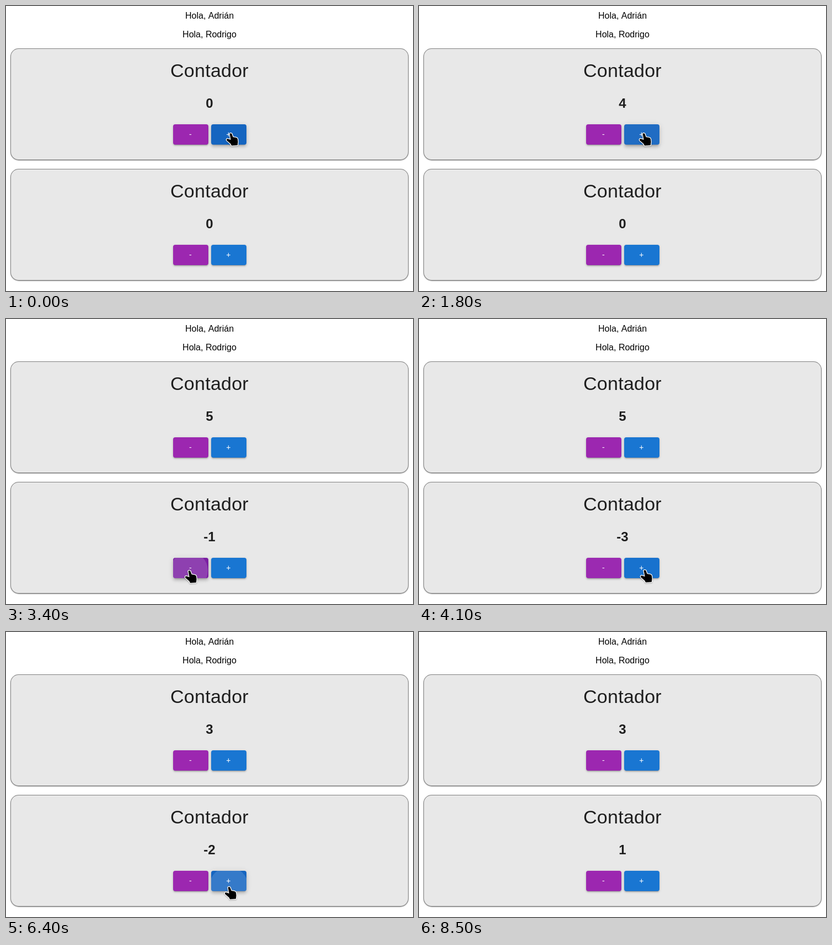
These frames come from a looping animation (738 by 518 pixels, 8.9 s). An HTML page with a canvas:

```html
<!DOCTYPE html>
<html lang="es">
<head>
<meta charset="utf-8">
<title>Contador</title>
<style>
  html, body { margin: 0; width: 100%; height: 100%; overflow: hidden; background: #fff; }
  canvas { display: block; }
</style>
</head>
<body>
<canvas id="stage" width="738" height="518"></canvas>
<script>
const ctx = document.getElementById('stage').getContext('2d');
const LOOP = 8900, STEP = 100, HOLD = 100, RIPPLE = 550, FADE = 250, EXIT = 8400;
const FONT = '"Liberation Sans", Arial, sans-serif';
const INK = 'rgba(0,0,0,0.87)';
const BUTTON = { w: 64, h: 37, r: 4 };
const STYLE = {
  [-1]: { label: '-', x: 303, idle: [156, 39, 176], hover: [123, 31, 162] },
  [1]: { label: '+', x: 372, idle: [25, 118, 210], hover: [21, 101, 192] }
};
const cardTop = counter => 77 + 219 * counter;
const buttonTop = counter => cardTop(counter) + 138;

// Where the pointer rests, and the evenly spaced clicks it makes there
const stops = [
  { x: 407, y: 231, arrive: -1000, leave: 2300, counter: 0, sign: 1, first: 340, gap: 350, clicks: 5 },
  { x: 305, y: 489, arrive: 2765, leave: 2765 },
  { x: 332, y: 457, arrive: 3080, leave: 3850, counter: 1, sign: -1, first: 3120, gap: 250, clicks: 3 },
  { x: 409, y: 456, arrive: 4100, leave: 4200, counter: 1, sign: 1, clicks: 0 },
  { x: 335, y: 243, arrive: 4700, leave: 5550, counter: 0, sign: -1, first: 4880, gap: 320, clicks: 2 },
  { x: 404, y: 463, arrive: 5970, leave: 7700, counter: 1, sign: 1, first: 6115, gap: 395, clicks: 4 },
  { x: 118, y: 1, arrive: 8100, leave: 8200 },
  { x: 64, y: -8, arrive: EXIT, leave: EXIT }
];
for (const s of stops) {
  s.presses = Array.from({ length: s.clicks || 0 }, (_, i) => s.first + i * s.gap);
}
const stopsOn = (counter, sign) => stops.filter(s => s.counter === counter && s.sign === sign);

const clamp = v => Math.max(0, Math.min(1, v));
const lerp = (a, b, k) => a + (b - a) * k;
const smooth = k => k * k * (3 - 2 * k);

// cubic-bezier(0.4, 0, 0.2, 1), solved by bisection
function ease(x) {
  x = clamp(x);
  let lo = 0, hi = 1;
  for (let i = 0; i < 18; i++) {
    const s = (lo + hi) / 2;
    const bx = 1.2 * s * (1 - s) ** 2 + 0.6 * s * s * (1 - s) + s ** 3;
    if (bx < x) lo = s; else hi = s;
  }
  return smooth(lo);
}

function pointerAt(t) {
  if (t > EXIT) return null;
  const i = stops.findIndex(s => t <= s.leave);
  const to = stops[i], from = stops[i - 1];
  if (t >= to.arrive) return to;
  const k = smooth((t - from.leave) / (to.arrive - from.leave));
  return { x: lerp(from.x, to.x, k), y: lerp(from.y, to.y, k) };
}

// 0 = idle, 1 = hovered, 2 = pressed, smoothed after every change
function buttonLevel(visits, t) {
  const events = visits.flatMap(s => [
    [s.arrive - 60, 1],
    ...s.presses.flatMap(p => [[p, 2], [p + HOLD, 1]]),
    [s.leave + 90, 0]
  ]);
  let from = 0, to = 0, since = 0;
  const at = time => lerp(from, to, ease((time - since) / FADE));
  for (const [time, target] of events) {
    if (time > t) break;
    [from, to, since] = [at(time), target, time];
  }
  return at(t);
}

const countAt = (counter, t) => stops
  .filter(s => s.counter === counter)
  .reduce((sum, s) => sum + s.sign * s.presses.filter(p => p + HOLD <= t).length, 0);

function roundRect(x, y, w, h, r) {
  ctx.beginPath();
  ctx.roundRect(x, y, w, h, r);
}

function shadowLayer(box, alpha, dy, blur, spread) {
  const away = 2000;
  ctx.save();
  ctx.shadowColor = `rgba(0,0,0,${alpha})`;
  ctx.shadowBlur = blur;
  ctx.shadowOffsetX = away;
  ctx.shadowOffsetY = dy;
  ctx.fillStyle = '#000';
  roundRect(box.x - spread - away, box.y - spread,
    box.w + 2 * spread, box.h + 2 * spread, box.r + spread);
  ctx.fill();
  ctx.restore();
}

// Umbra, penumbra and ambient shadow of a raised surface
function elevate(box, e) {
  shadowLayer(box, 0.2, 1.5 + 0.4 * e, 0.6 * e, -1 - e / 4);
  shadowLayer(box, 0.14, e, 1.25 * e, 0);
  shadowLayer(box, 0.12, Math.max(1, e / 3), Math.min(14, 2.5 * e), 0);
}

function text(str, x, y, font, color, spacing = 0) {
  ctx.font = `${font} ${FONT}`;
  ctx.letterSpacing = `${spacing}px`;
  ctx.textAlign = 'center';
  ctx.fillStyle = color;
  ctx.fillText(str, x, y);
}

function drawRipple(box, { x, y }, age) {
  if (age < 0 || age > HOLD + RIPPLE) return;
  const dx = Math.max(x - box.x, box.x + box.w - x);
  const dy = Math.max(y - box.y, box.y + box.h - y);
  const grow = ease(age / RIPPLE);
  const alpha = lerp(0.1, 0.3, grow) * (1 - ease((age - HOLD) / RIPPLE));
  ctx.fillStyle = `rgba(255,255,255,${alpha})`;
  ctx.beginPath();
  ctx.arc(x, y, Math.hypot(dx + 1, dy + 1) * grow, 0, 2 * Math.PI);
  ctx.fill();
}

function drawButton(counter, sign, t) {
  const { label, x, idle, hover } = STYLE[sign];
  const box = { ...BUTTON, x, y: buttonTop(counter) };
  const visits = stopsOn(counter, sign);
  const level = buttonLevel(visits, t);
  elevate(box, 2 * 2 ** level);

  ctx.save();
  roundRect(box.x, box.y, box.w, box.h, box.r);
  ctx.fillStyle = `rgb(${idle.map((v, i) => Math.round(lerp(v, hover[i], clamp(level))))})`;
  ctx.fill();
  ctx.clip();
  text(label, box.x + 31.5, box.y + 23, '500 14px', '#fff', 0.4);
  visits.forEach(s => s.presses.forEach(p => drawRipple(box, s, t - p)));
  ctx.restore();
}

function drawCounter(counter, t) {
  const card = { x: 8, y: cardTop(counter), w: 722, h: 203, r: 15 };
  elevate(card, 1);
  roundRect(card.x, card.y, card.w, card.h, card.r);
  ctx.fillStyle = '#808080';
  ctx.fill();
  roundRect(card.x + 1, card.y + 1, card.w - 2, card.h - 2, card.r - 1);
  ctx.fillStyle = '#e8e8e8';
  ctx.fill();
  text('Contador', 369, card.y + 52, '34px', INK, 0.25);
  text(String(countAt(counter, t)), 369, card.y + 108, 'bold 24px', INK);
  drawButton(counter, -1, t);
  drawButton(counter, 1, t);
}

const arrowShape = new Path2D('M1.5 1.5V22.5L7.5 16.8L17 15.2Z');
const handShape = new Path2D(
  'M-1.4 1.2Q0.8 -0.6 2.4 1.4L4.6 7.2L10.4 8.2Q12.6 8.8 13 11L13.6 16L12.8 22' +
  'L2 22.8L0.4 19.6L-6.6 13.4Q-7.8 11.2 -5.4 10.2L0.6 12.2Z');

function overButton({ x, y }) {
  const inside = (v, start, size) => v >= start && v < start + size;
  return [0, 1].some(c => inside(y, buttonTop(c), BUTTON.h)) &&
    [-1, 1].some(s => inside(x, STYLE[s].x, BUTTON.w));
}

function drawPointer(t) {
  const p = pointerAt(t);
  if (!p) return;
  const shape = overButton(p) ? handShape : arrowShape;
  ctx.save();
  ctx.translate(p.x, p.y);
  ctx.lineJoin = 'round';
  ctx.lineWidth = 2.6;
  ctx.strokeStyle = '#fff';
  ctx.shadowColor = 'rgba(0,0,0,0.3)';
  ctx.shadowBlur = 2;
  ctx.shadowOffsetY = 1;
  ctx.stroke(shape);
  ctx.shadowColor = 'transparent';
  ctx.fillStyle = '#000';
  ctx.fill(shape);
  ctx.restore();
}

function draw(t) {
  ctx.fillStyle = '#fff';
  ctx.fillRect(0, 0, 738, 518);
  text('Hola, Adrián', 369, 23, '16px', '#000');
  text('Hola, Rodrigo', 369, 57, '16px', '#000');
  drawCounter(0, t);
  drawCounter(1, t);
  drawPointer(t);
}

// The picture advances in tenths of a second and rests at its start
function stageTime(elapsed) {
  const t = Math.floor((elapsed % LOOP) / STEP) * STEP;
  return t < 600 ? 0 : t;
}

const start = performance.now();
function tick() {
  draw(stageTime(performance.now() - start));
  requestAnimationFrame(tick);
}
tick();
</script>
</body>
</html>
```
